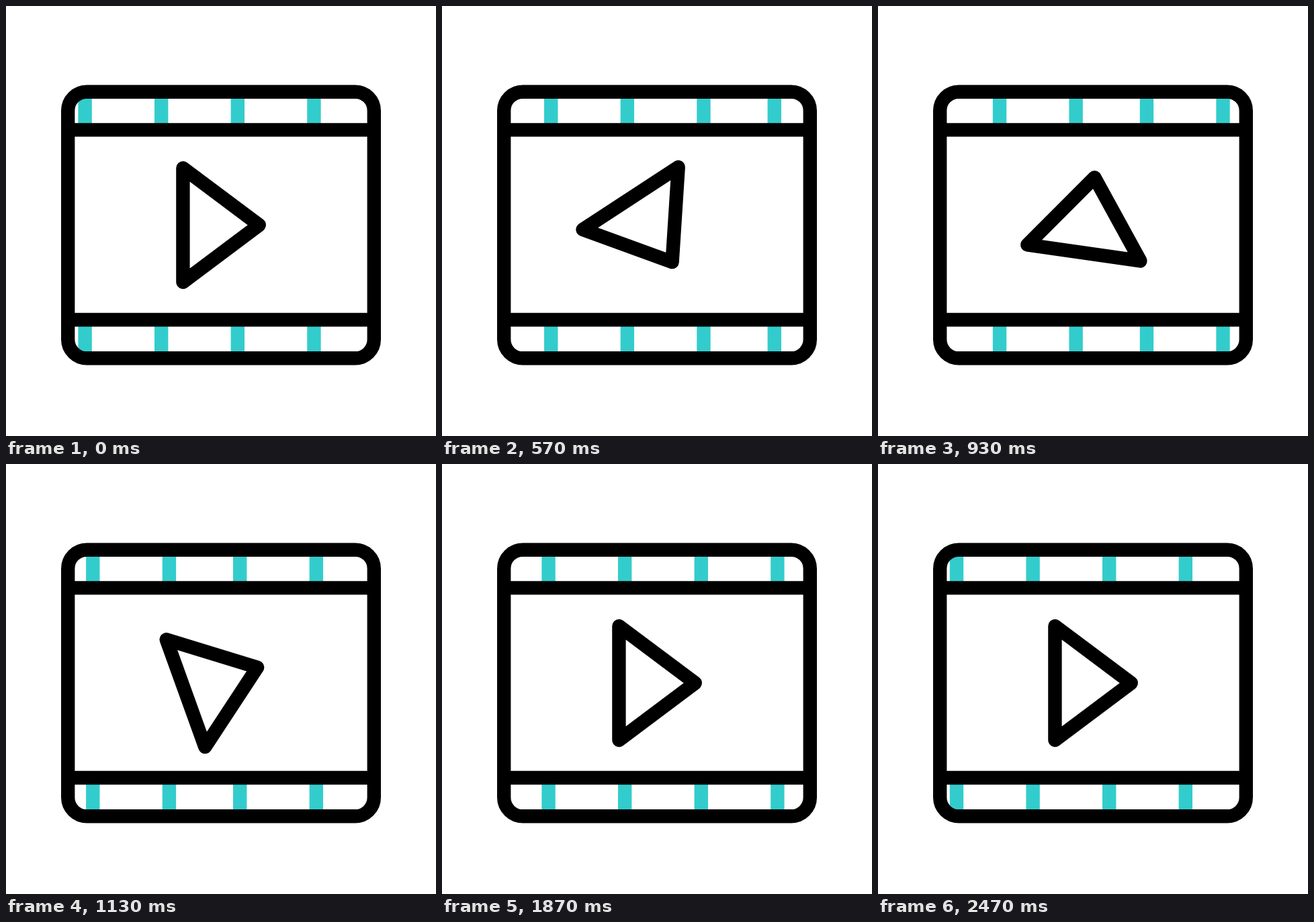
Write an HTML page with a canvas that moves like this. It is 640 px wide and 640 px high and loops after 2.5 s.

```html
<!DOCTYPE html>
<html lang="en">
<head>
<meta charset="utf-8">
<title>Video strip</title>
<style>
  html, body { margin: 0; width: 100%; height: 100%; overflow: hidden; background: #fff; }
  canvas { display: block; width: 100%; height: 100%; }
</style>
</head>
<body>
<canvas id="stage" width="640" height="640"></canvas>
<script>
const ctx = document.getElementById('stage').getContext('2d');

const LOOP = 2500, HOLD = 300, FPS = 30;
const LINE = 20.4;
const BAR_GAP = 113.6, BAR_SPEED = 8.62;
const SPIN_STEPS = 32;
const PIVOT = { x: 308.75, y: 322 };

// Two runs of bars with a slightly narrower gap between them
const bars = [];
for (let i = 0; i < 4; i++) bars.push(107.4 + i * BAR_GAP);
for (let i = 0; i < 6; i++) bars.push(553.5 + i * BAR_GAP);

// Cubic bezier ease with flat ends
function ease(p) {
  if (p <= 0) return 0;
  if (p >= 1) return 1;
  const x1 = 0.416, x2 = 0.41;
  let lo = 0, hi = 1, s;
  for (let i = 0; i < 30; i++) {
    s = (lo + hi) / 2;
    const r = 1 - s;
    const x = 3 * r * r * s * x1 + 3 * r * s * s * x2 + s * s * s;
    if (x < p) lo = s; else hi = s;
  }
  return s * s * (3 - 2 * s);
}

// Motion advances in 30 fps steps, timed to whole 10 ms
function stepAt(ms) {
  const t = Math.floor(((ms % LOOP) - HOLD) / 10) * 10;
  return Math.max(0, Math.floor((t + 5) * FPS / 1000));
}

function framePath() {
  ctx.beginPath();
  ctx.roundRect(92.2, 127.7, 455.6, 396.6, 28);
}

function drawBars(step) {
  ctx.save();
  framePath();
  ctx.clip();
  ctx.fillStyle = '#33cccc';
  for (const start of bars) {
    const x = start - step * BAR_SPEED;
    ctx.fillRect(x, 128, LINE, 56);
    ctx.fillRect(x, 467, LINE, 57);
  }
  ctx.restore();
}

function drawFrame() {
  framePath();
  for (const y of [184.4, 467]) {
    ctx.moveTo(92.2, y);
    ctx.lineTo(547.8, y);
  }
  ctx.stroke();
}

function drawPlay(step) {
  ctx.save();
  ctx.translate(PIVOT.x, PIVOT.y);
  ctx.rotate(ease(step / SPIN_STEPS) * Math.PI * 2);
  ctx.translate(-PIVOT.x, -PIVOT.y);
  ctx.beginPath();
  ctx.moveTo(263.4, 241.1);
  ctx.lineTo(376.8, 326);
  ctx.lineTo(263.4, 411);
  ctx.closePath();
  ctx.stroke();
  ctx.restore();
}

function draw(ms) {
  const step = stepAt(ms);
  ctx.fillStyle = '#fff';
  ctx.fillRect(0, 0, 640, 640);
  ctx.strokeStyle = '#000';
  ctx.lineWidth = LINE;
  ctx.lineJoin = 'round';
  drawBars(step);
  drawFrame();
  drawPlay(step);
}

const begin = performance.now();
function tick() {
  draw(performance.now() - begin);
  requestAnimationFrame(tick);
}
tick();
</script>
</body>
</html>
```
